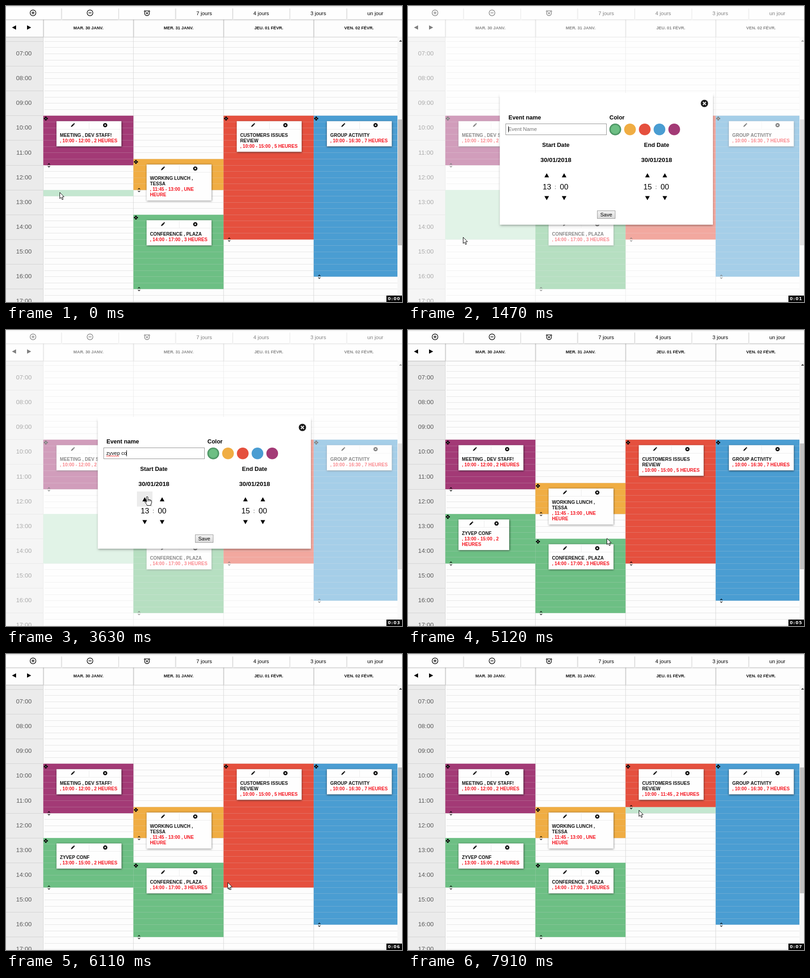
Animation of 865x647 px, one loop 8000 ms. Source, as an HTML page with a canvas:

```html
<!DOCTYPE html>
<html lang="fr">
<head>
<meta charset="utf-8">
<title>Agenda</title>
<style>
html, body { margin: 0; width: 100%; height: 100%; overflow: hidden; background: #fff; }
canvas { display: block; }
</style>
</head>
<body>
<canvas id="stage" width="865" height="647"></canvas>
<script>
const ctx = document.getElementById('stage').getContext('2d');
const LOOP = 8000, HOUR = 54.13, QUARTER = HOUR / 4;
const SANS = '"Liberation Sans", Arial, sans-serif';
const COLS = [81.5, 278.3, 475.2, 672.1, 855];
const GREEN = '#6dbf84', ORANGE = '#f0ad43', RED = '#e5503e', BLUE = '#4a9dd2', PURPLE = '#a33a76';
const MINT = '#c4e7d0';

// Moments at which the interface changes, in ms
const DRAG = 460, OPEN = 1470, CLOSE = 5110, GRAB = 6650, DROP = 7740;
const KEYS = [2480, 2680, 2980, 3070, 3250, 3440, 3530, 3630, 3810, 3980];
const SECONDS = [1000, 2000, 2980, 3980, 5000, 6000, 7090];
const TYPED = 'zyvep conf';

// Pointer tip: time, x, y
const PATH = [
  [0, 117, 407], [460, 117, 407], [1190, 120, 505], [1740, 120, 505], [2100, 308, 364],
  [4360, 308, 364], [4630, 580, 400], [4810, 434, 455], [5110, 434, 455], [5400, 408, 440],
  [5740, 474, 468], [6280, 487, 509], [6650, 487, 509], [7000, 500, 332], [7190, 502, 328],
  [7300, 502, 328], [7370, 504, 340], [7550, 504, 344], [7740, 504, 341]
];
const HOTSPOT = 4;

const yOf = hour => 239.8 + (hour - 10) * HOUR;
const hourOf = y => 10 + (y - 239.8) / HOUR;

function pointer(t) {
  let i = PATH.length - 1;
  while (PATH[i][0] > t) i--;
  const a = PATH[i], b = PATH[i + 1];
  if (!b) return { x: a[1], y: a[2] };
  const u = (t - a[0]) / (b[0] - a[0]), e = u * u * (3 - 2 * u);
  return { x: a[1] + (b[1] - a[1]) * e, y: a[2] + (b[2] - a[2]) * e };
}

function rect(x, y, w, h, color) {
  ctx.fillStyle = color;
  ctx.fillRect(x, y, w, h);
}

function frame(x, y, w, h, color) {
  ctx.strokeStyle = color;
  ctx.lineWidth = 1;
  ctx.strokeRect(x + .5, y + .5, w - 1, h - 1);
}

function text(str, x, y, size, opt = {}) {
  ctx.font = `${opt.bold ? 'bold ' : ''}${size}px ${opt.font || SANS}`;
  ctx.textAlign = opt.align || 'left';
  ctx.fillStyle = opt.color || '#000';
  ctx.fillText(str, x, y);
}

function line(points, color, width) {
  ctx.beginPath();
  points.forEach(([x, y]) => ctx.lineTo(x, y));
  ctx.strokeStyle = color;
  ctx.lineWidth = width;
  ctx.stroke();
}

function poly(points, color) {
  ctx.beginPath();
  points.forEach(([x, y]) => ctx.lineTo(x, y));
  ctx.closePath();
  ctx.fillStyle = color;
  ctx.fill();
}

function disc(x, y, r, color) {
  ctx.beginPath();
  ctx.arc(x, y, r, 0, 7);
  ctx.fillStyle = color;
  ctx.fill();
}

function ring(x, y, r, color, width) {
  ctx.beginPath();
  ctx.arc(x, y, r, 0, 7);
  ctx.strokeStyle = color;
  ctx.lineWidth = width;
  ctx.stroke();
}

function shadowBox(x, y, w, h, color, blur, dx, dy, alpha) {
  ctx.save();
  ctx.shadowColor = `rgba(0,0,0,${alpha})`;
  ctx.shadowBlur = blur;
  ctx.shadowOffsetX = dx;
  ctx.shadowOffsetY = dy;
  rect(x, y, w, h, color);
  ctx.restore();
}

function cross(x, y, r, color, width) {
  line([[x - r, y - r], [x + r, y + r]], color, width);
  line([[x + r, y - r], [x - r, y + r]], color, width);
}

function plus(x, y, r, width) {
  line([[x - r, y], [x + r, y]], '#000', width);
  line([[x, y - r], [x, y + r]], '#000', width);
}

// Grey edge that fades out over a few pixels
function softEdge(x, y, w, h, alpha) {
  const g = w < h ? ctx.createLinearGradient(x, 0, x + w, 0) : ctx.createLinearGradient(0, y, 0, y + h);
  g.addColorStop(0, `rgba(0,0,0,${alpha})`);
  g.addColorStop(1, 'rgba(0,0,0,0)');
  rect(x, y, w, h, g);
}

function drawHeader() {
  rect(0, 0, 865, 67, '#fdfdfd');
  rect(0, 1, 865, 1, '#d2d2d2');
  for (let i = 0; i < 7; i++)
    shadowBox(-2.4 + i * 124.6, 4, 123.6, 25, '#fefefe', 3, 0, 1, .28);
  rect(0, 2, 865, 3, '#fefefe');
  ring(59, 15, 6.3, '#000', 1.3);
  plus(59, 15, 3.4, 1.3);
  ring(183.5, 15, 6.3, '#000', 1.3);
  line([[180, 15], [187, 15]], '#000', 1.3);
  ring(308, 15.7, 5.3, '#000', 1.3);
  plus(308, 15.7, 2.8, 1.2);
  line([[301.5, 12.2], [304.3, 9.6]], '#000', 1.3);
  line([[314.5, 12.2], [311.7, 9.6]], '#000', 1.3);
  ['7 jours', '4 jours', '3 jours', 'un jour'].forEach((s, i) =>
    text(s, 432.8 + i * 124.6, 20, 11.4, { align: 'center' }));

  poly([[13, 47], [22, 42.3], [22, 51.7]], '#000');
  poly([[55, 47], [46, 42.3], [46, 51.7]], '#000');
  ['MAR. 30 JANV.', 'MER. 31 JANV.', 'JEU. 01 FÉVR.', 'VEN. 02 FÉVR.'].forEach((s, i) => {
    text(s, 180 + i * 197, 51, 9.25, { align: 'center', bold: true, color: '#111' });
    softEdge(COLS[i] - .6, 30, 3, 37, .26);
  });
  softEdge(0, 67, 855, 3, .15);
}

function quarterLines(x, w, top, bottom, color) {
  for (let y = yOf(7); y < 647; y += QUARTER)
    if (y >= top && y < bottom) rect(x, Math.floor(y), w, 1, color);
}

function drawGrid() {
  rect(0, 0, 865, 647, '#fdfdfd');
  rect(0, 67, 81, 580, '#ebebeb');
  quarterLines(84, 771, 67, 647, '#e4e4e4');
  for (let h = 7; h <= 17; h++) {
    rect(0, Math.floor(yOf(h)), 81, 1, '#d2d2d2');
    text(String(h).padStart(2, '0') + ':00', 39, yOf(h) + 30.6, 13.6, { align: 'center', color: '#5a5a5a' });
  }
  COLS.slice(0, 4).forEach(x => rect(x - .5, 67, 1, 580, '#d8d8d8'));
}

function drawScrollbar() {
  rect(855, 67, 10, 580, '#f6f6f6');
  rect(856, 248, 9, 275, '#c1c1c1');
  poly([[858.5, 78], [865, 78], [862, 74]], '#444');
}

function drawPencil(x, y) {
  ctx.save();
  ctx.translate(x, y);
  ctx.rotate(Math.PI / 4);
  rect(-1.4, -5.3, 2.8, 1.8, '#000');
  rect(-1.4, -3, 2.8, 6, '#000');
  poly([[-1.4, 3], [1.4, 3], [0, 5.6]], '#000');
  ctx.restore();
}

function drawMove(x, y) {
  for (const [dx, dy] of [[-2.8, 0], [2.8, 0], [0, -2.8], [0, 2.8]]) disc(x + dx, y + dy, 1.8, '#000');
  plus(x, y, 3.4, 1.3);
  disc(x, y, .8, '#fff');
}

function drawHandle(x, y) {
  line([[x - 2.3, y - 1.5], [x, y - 3.8], [x + 2.3, y - 1.5]], '#000', 1.2);
  line([[x - 2.3, y + 1.5], [x, y + 3.8], [x + 2.3, y + 1.5]], '#000', 1.2);
}

function drawCard(x, y, w, title, time) {
  const h = 31 + 12 * (title.length + time.length);
  shadowBox(x, y, w, h, '#fefefe', 4, .5, 1, .6);
  rect(x, Math.round(y + 17), w, 1, '#ececec');
  rect(Math.round(x + w / 2), y, 1, 17, '#ececec');
  drawPencil(x + w / 4, y + 8.8);
  const cx = x + w * .75;
  disc(cx, y + 8.8, 4.6, '#000');
  cross(cx, y + 8.8, 1.7, '#fff', 1.2);
  const put = (s, i, color) => text(s, x + 7.4, Math.round(y + 34) + i * 12, 10.13, { bold: true, color });
  title.forEach((s, i) => put(s, i, '#111'));
  time.forEach((s, i) => put(s, title.length + i, '#f5121d'));
}

function eventsAt(t) {
  const cut = t >= DROP;
  const list = [
    { col: 0, from: 10, to: 12, color: PURPLE, title: ['MEETING , DEV STAFF!'], time: [', 10:00 - 12:00 , 2 HEURES'] },
    { col: 1, from: 11.75, to: 13, color: ORANGE, title: ['WORKING LUNCH ,', 'TESSA'], time: [', 11:45 - 13:00 , UNE', 'HEURE'] },
    { col: 1, from: 14, to: 17, color: GREEN, title: ['CONFERENCE , PLAZA'], time: [', 14:00 - 17:00 , 3 HEURES'] },
    { col: 2, from: 10, to: cut ? 11.75 : 15, color: RED, title: ['CUSTOMERS ISSUES', 'REVIEW'],
      time: [cut ? ', 10:00 - 11:45 , 2 HEURES' : ', 10:00 - 15:00 , 5 HEURES'] },
    { col: 3, from: 10, to: 16.5, color: BLUE, title: ['GROUP ACTIVITY'], time: [', 10:00 - 16:30 , 7 HEURES'] }
  ];
  if (t >= CLOSE) {
    const width = Math.min(142, 110 + 32 * (t - CLOSE) / 460);
    list.push({ col: 0, from: 13, to: 15, color: GREEN, width, title: [TYPED.toUpperCase()],
      time: width < 140 ? [', 13:00 - 15:00 , 2', 'HEURES'] : [', 13:00 - 15:00 , 2 HEURES'] });
  }
  return list;
}

function drawEvents(events) {
  for (const e of events) {
    const x = COLS[e.col], w = COLS[e.col + 1] - x, top = yOf(e.from), end = yOf(e.to);
    rect(x, top, w, end - top, e.color);
    quarterLines(x, w, top + 2, end - 2, 'rgba(215,215,215,.25)');
    drawMove(x + 5.5, top + 6.2);
  }
  for (const e of events) {
    const x = COLS[e.col];
    drawHandle(x + 12.3, yOf(e.to) + .2);
    drawCard(x + 28.8, yOf(e.from) + 11.9, e.width || 141.8, e.title, e.time);
  }
}

function mint(col, from, to) {
  rect(COLS[col], yOf(from), COLS[col + 1] - COLS[col], yOf(to) - yOf(from), MINT);
}

// Selected range while dragging, otherwise the free quarter under the pointer
function drawSelection(t, p, events) {
  const slot = Math.floor(hourOf(p.y + HOTSPOT) * 4) / 4;
  if (t >= DRAG && t < OPEN) mint(0, 13, slot + .25);
  else if (t >= OPEN && t < CLOSE) mint(0, 13, 15);
  else if (t < GRAB || t >= DROP) {
    const col = COLS.findIndex((x, i) => p.x >= x && p.x < COLS[i + 1]);
    if (!events.some(e => e.col === col && slot >= e.from && slot < e.to)) mint(col, slot, slot + .25);
  }
}

const ARROWS = [303, 341, 523, 561].flatMap(x => [[x, 370, -1], [x, 420, 1]]);
const overArrow = p => ARROWS.find(([x, y]) => Math.abs(p.x - x) < 17 && Math.abs(p.y - y) < 17);

function drawInput(t) {
  rect(213, 257, 221, 25, '#fff');
  frame(213, 257, 221, 25, '#8f8f8f');
  const count = KEYS.filter(k => k <= t).length, value = TYPED.slice(0, count);
  if (count) text(value, 219, 273, 11.4, { color: '#111' });
  else text('Event Name', 219, 273, 11.4, { color: '#757575' });
  if (count > 5) {
    const wave = [];
    for (let x = 0; x <= 28; x += 2) wave.push([219 + x, 274.6 + x / 2 % 2 * 1.6]);
    line(wave, '#f00', .9);
  }
  ctx.font = `11.4px ${SANS}`;
  const caret = Math.floor(219 + ctx.measureText(value).width);
  const since = t - (count ? KEYS[count - 1] : OPEN);
  if (since % 1060 < 530) rect(caret, 263, 1, 13, '#000');
}

function drawSuggestions() {
  rect(213, 282, 221, 42, '#fff');
  frame(213, 282, 221, 42, '#a9a9a9');
  text('zyvep conf', 219, 297, 11.4);
  text('zyvep team', 219, 316, 11.4);
}

function drawModal(t, p) {
  rect(0, 0, 865, 647, 'rgba(255,255,255,.5)');
  shadowBox(200.5, 194, 465.5, 284, '#fff', 5, 0, 2, .35);
  rect(200, 190, 466, 10, '#fff');
  disc(647.5, 213, 8, '#1c1c1c');
  cross(647.5, 213, 3.2, '#fff', 2);
  text('Event name', 219.5, 248, 12.67, { bold: true });
  text('Color', 440, 248, 12.67, { bold: true });
  [GREEN, ORANGE, RED, BLUE, PURPLE].forEach((c, i) => disc(452.7 + i * 32.2, 269.7, 12.8, c));
  const g = ctx.createRadialGradient(452.7, 269.7, 8.5, 452.7, 269.7, 12.8);
  g.addColorStop(0, 'rgba(30,90,55,0)');
  g.addColorStop(1, 'rgba(30,90,55,.6)');
  disc(452.7, 269.7, 12.8, g);

  const hot = overArrow(p);
  if (hot) rect(hot[0] - 17, hot[1] - 17, 34, 33, '#ececec');
  for (const [x, y, d] of ARROWS) poly([[x - 5, y - 4.5 * d], [x + 5, y - 4.5 * d], [x, y + 4.5 * d]], '#000');
  [['Start Date', '13', 323], ['End Date', '15', 543]].forEach(([label, hour, x]) => {
    const c = { align: 'center' };
    text(label, x, 308, 12.67, { align: 'center', bold: true });
    text('30/01/2018', x, 341, 13.5, { align: 'center', bold: true });
    text(hour, x - 19.5, 401, 16.6, c);
    text(':', x - 1, 400, 13.5, { align: 'center', color: '#555' });
    text('00', x + 18, 401, 16.6, c);
  });

  const save = ctx.createLinearGradient(0, 447, 0, 465);
  const lit = p.x > 413 && p.x < 453 && p.y > 447 && p.y < 465;
  save.addColorStop(0, lit ? '#f8f8f8' : '#f4f4f4');
  save.addColorStop(1, lit ? '#e4e4e4' : '#d9d9d9');
  rect(413, 447, 40, 18, save);
  frame(413, 447, 40, 18, lit ? '#777' : '#9a9a9a');
  text('Save', 433, 460, 11.4, { align: 'center' });

  drawInput(t);
  if (t >= KEYS[0] && t < KEYS[1]) drawSuggestions();
}

function outlined(points) {
  poly(points, '#fff');
  ctx.strokeStyle = '#000';
  ctx.lineWidth = 1;
  ctx.stroke();
}

function drawHand() {
  ctx.lineJoin = 'round';
  outlined([[-1.5, 0], [1, 0], [1.5, 1.5], [1.5, 6], [4.5, 6.2], [7, 7], [9.3, 8.3], [9.5, 13], [8, 16.5],
    [8, 19], [-.5, 19], [-1, 17], [-5, 11.5], [-4.5, 10], [-3, 10.2], [-1.5, 12]]);
  [1.5, 4.2, 6.8].forEach((x, i) => line([[x, 6.5 + i * .4], [x, 10]], '#000', 1));
}

function drawDragMark() {
  ring(.5, 1, 9, '#5a4a4a', 1);
  ring(.5, 1, 8, 'rgba(255,255,255,.6)', 1);
  ctx.setLineDash([1, 1]);
  ctx.strokeStyle = '#444';
  ctx.strokeRect(2, 14, 11, 6);
  ctx.setLineDash([]);
}

function drawPointer(t, p) {
  ctx.save();
  ctx.translate(Math.round(p.x) + .5, Math.round(p.y) + .5);
  if (t >= GRAB && t < DROP) drawDragMark();
  if (t >= OPEN && t < CLOSE && overArrow(p)) drawHand();
  else outlined([[0, 0], [0, 13.5], [3, 10.8], [5.2, 15.8], [7.4, 14.8], [5.2, 10], [9.4, 9.6]]);
  ctx.restore();
}

function drawClock(t) {
  rect(831, 633, 34, 14, '#000');
  const s = SECONDS.filter(k => k <= t).length;
  ctx.letterSpacing = '1.2px';
  text('0:0' + s, 834, 643, 9.2, { bold: true, color: '#fff', font: '"DejaVu Sans", sans-serif' });
  ctx.letterSpacing = '0px';
}

function draw(t) {
  const p = pointer(t), events = eventsAt(t);
  drawGrid();
  drawSelection(t, p, events);
  drawEvents(events);
  drawScrollbar();
  drawHeader();
  if (t >= OPEN && t < CLOSE) drawModal(t, p);
  drawPointer(t, p);
  drawClock(t);
}

const start = performance.now();
function tick() {
  draw((performance.now() - start) % LOOP);
  requestAnimationFrame(tick);
}
tick();
</script>
</body>
</html>
```
